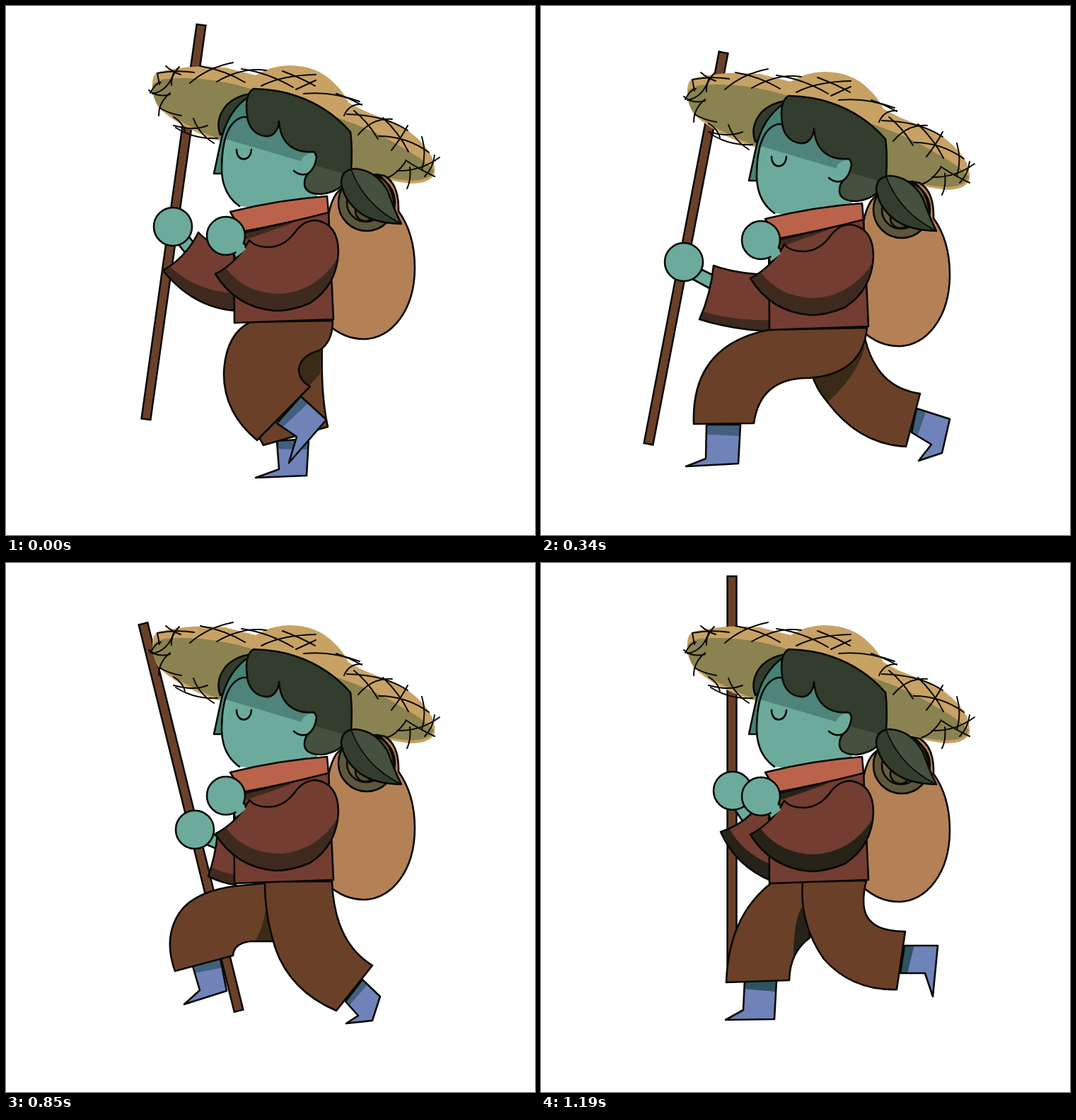
Animation of 748 by 748 pixels, one loop 1.36 s. Source, as an HTML page:

```html
<!DOCTYPE html>
<html lang="en">
<head>
<meta charset="utf-8">
<title>Wanderer</title>
<style>
html, body { margin: 0; width: 100%; height: 100%; overflow: hidden; background: #fff; }
svg { display: block; width: 100vw; height: 100vh; }
</style>
</head>
<body>
<svg id="stage" viewBox="0 0 748 748" fill="none" stroke-linecap="round" stroke-linejoin="round">
  <clipPath id="shade"><path d="M280 60V179L500 244V60Z"/></clipPath>
  <g id="scene"></g>
</svg>
<script>
const STEP = 170;
const INK = '#080806', SKIN = '#6cab9b', SKIN_DARK = '#4e8479', HAIR = '#46503f', HAIR_DARK = '#323d2e';
const COAT = '#743d31', PANTS = '#6a4128', BOOT = '#6f83b8';

const fill = (d, c, extra = '') => `<path d="${d}" fill="${c}" ${extra}/>`;
const line = (d, w = 2.6) => `<path d="${d}" stroke="${INK}" stroke-width="${w}"/>`;
const shape = (d, c) => fill(d, c) + line(d);
const shaded = (d, lit, dark) => fill(d, lit) + fill(d, dark, 'clip-path="url(#shade)"');
const disc = (x, y, r, c) =>
  `<circle cx="${x}" cy="${y}" r="${r}" fill="${c}" stroke="${INK}" stroke-width="2.6"/>`;
const shift = (dy, body) => `<g transform="translate(0 ${dy})">${body}</g>`;
const mix = (a, b, k) => [a[0] + (b[0] - a[0]) * k, a[1] + (b[1] - a[1]) * k];

function staff([x1, y1, x2, y2]) {
  const len = Math.hypot(x2 - x1, y2 - y1), ux = (x2 - x1) / len, uy = (y2 - y1) / len;
  const seg = (e, w, c) => `<path d="M${x1 - ux * e} ${y1 - uy * e}L${x2 + ux * e} ${y2 + uy * e}"
    stroke="${c}" stroke-width="${w}" stroke-linecap="butt"/>`;
  return seg(1.5, 15.4, INK) + seg(-1, 10.4, PANTS);
}

// Points run: two along the top, heel, toe, ankle
function boot(text, dark) {
  const p = text.split(' ').map(s => s.split(',').map(Number));
  const d = `M${p.join('L')}Z`;
  const band = [p[0], p[1], mix(p[1], p[2], .29), mix(p[0], p[p.length - 1], .29)];
  return fill(d, BOOT) + fill(`M${band.join('L')}Z`, dark) + line(d);
}

const hat = fill('M207 110Q207 96 216 93Q262 82 310 87L353 98Q376 84 400 84Q440 84 464 109Q477 121 484 136Q506 150 538 160Q572 174 592 198Q608 216 606 236Q601 251 572 251Q530 246 485 231L300 190Q248 174 216 144Q207 130 207 110Z', '#c8a264')
  + fill('M207 112Q212 106 224 103Q285 98 346 117L480 162Q530 180 560 200Q590 216 605 232Q601 247 570 247Q530 243 485 230L302 188Q252 170 217 143Q206 130 207 112Z', '#8a8250')
  + [
    'M214 95L217 111', 'M214 95Q240 90 266 94', 'M245 86Q232 100 234 112', 'M238 92Q230 120 207 124',
    'M226 85Q235 93 247 97', 'M260 109Q285 87 321 80', 'M275 85Q310 91 338 108', 'M298 107Q335 86 368 91',
    'M333 89Q370 94 406 115', 'M361 113Q390 98 438 97', 'M391 92Q420 103 437 113', 'M410 118L438 105',
    'M421 124Q460 120 500 135', 'M467 124Q485 130 503 140', 'M478 155Q485 138 503 139',
    'M482 153Q535 154 568 176', 'M492 148Q512 164 526 188', 'M498 182Q518 158 546 160',
    'M533 158Q556 180 569 206', 'M527 184Q566 184 598 207', 'M545 204Q558 188 568 169',
    'M588 185Q595 208 588 232', 'M606 211Q604 229 592 241', 'M565 218Q583 230 606 241',
    'M553 233Q586 234 613 214', 'M571 228Q573 246 567 258', 'M538 243Q552 239 565 220',
    'M202 119Q214 130 232 125', 'M216 155Q216 136 232 123', 'M204 123Q211 109 219 108',
    'M217 144Q230 152 248 155', 'M237 157Q250 165 253 177', 'M237 169Q266 177 285 169',
    'M265 159Q273 181 294 194', 'M240 172Q267 189 299 187'
  ].map(d => line(d, 2)).join('');

const bag = shape('M455 300Q460 272 470 262Q500 232 535 240Q556 252 555 290Q578 322 578 370C578 430 545 471 506 471Q478 471 455 450', '#b48156')
  + disc(510, 278, 40, '#5d573b') + disc(509, 278, 27, '#68603f') + disc(508, 290, 14, '#575137')
  + line('M525 238Q546 250 549 282');

const face = 'M305 232Q306 266 330 283L380 288L440 275V180L357 173Q352 156 335 157Q305 165 305 232Z';
const hair = 'M341 155Q337 125 350 117Q385 118 410 127Q455 142 487 178Q490 200 488 232Q480 262 446 266Q423 266 422 252Q422 242 427 237Q437 230 439 214Q438 206 433 206C408 208 388 195 386 163C385 178 376 185 367 184C352 183 342 170 341 155Z';
const tail = 'M474 250Q474 231 494 230Q523 232 540 262Q549 288 559 308Q520 307 500 292Q478 275 474 250Z';
const head = shape('M303 182Q295 160 312 140Q325 127 346 124L341 160Z', HAIR_DARK)
  + shape('M345 127Q312 148 303 195L294 237H306L320 168L345 157Z', '#438475')
  + shaded(face, SKIN, SKIN_DARK)
  + line('M357 173Q352 156 335 157Q305 165 305 232Q306 266 330 283')
  + shaded(hair, HAIR, HAIR_DARK)
  + fill('M418 217Q424 207 438 207Q440 226 427 237L415 237Z', SKIN)
  + line(hair) + line('M407 233Q416 241 427 237')
  + line('M326 203C326 221 346 221 347 203')
  + fill(tail, HAIR_DARK) + fill('M494 230Q523 232 540 262Q549 288 559 308Q507 282 488 231Z', HAIR)
  + line(tail) + line('M488 231Q507 282 559 308', 1.6);

const torso = dark => shape('M322 312L456 290L463 443L323 448Z', COAT)
  + fill('M337 318L420 299L400 309L340 330Z', dark)
  + line('M337 321L425 300', 1.6)
  + shape('M317 291Q385 274 454 269L456 292Q395 308 334 319Z', '#ba634a');

function nearArm(dark) {
  const d = 'M344 331Q352 341 372 341Q393 340 407 322Q420 303 438 303Q470 308 470 348Q468 395 430 420Q405 431 380 431Q325 426 296 379Q328 362 344 331Z';
  return shape('M320 346L336 334L345 348L326 360Z', SKIN) + fill(d, COAT)
    + fill('M296 379L311 371Q338 406 386 407Q440 404 470 355Q466 397 430 420Q405 431 380 431Q325 426 296 379Z', dark)
    + line(d) + disc(311, 325, 27, SKIN) + fill('M323 343L334 335L339 344L328 353Z', SKIN);
}

const contactFront = 'Q310 525 301 590L216 591Q212 480 322 458Z';
const reachFront = 'H345Q322 538 321 555L239 577Q222 530 245 495Q265 465 323 457Z';
const contactBoots = ['234,592 282,592 279,647 205,651 233,640', '524,603 531,569 578,584 567,632 534,643 552,620'];

// dy: body, hat, bag, near arm; far and near: boot, trouser leg
const poses = [
  { dy: [0, 0, 0, 0], staff: [276, 27, 198, 584], hand: [236, 312],
    wrist: 'M243 336L258 325L272 344L258 355Z',
    sleeve: 'M272 320Q292 342 325 346V431Q265 427 222 374Q255 355 272 320Z',
    cuff: 'M222 374L232 369Q270 404 325 406V431Q265 427 222 374Z',
    far: ['383,615 428,612 425,664 353,667 386,655', 'M400 470L447 480Q445 550 455 595L364 621L355 605Z'],
    shadow: 'M445 486L444 520L428 538L412 520Q416 495 445 486Z',
    near: ['383,590 417,552 453,585 400,646 411,609', 'M345 447L462 445Q462 475 443 487Q415 495 414 515Q415 530 430 538L355 614Q308 575 308 520Q310 465 345 447Z'] },
  { dy: [6, 4, 5, 3], staff: [289, 35, 145, 579], hand: [208, 334],
    wrist: 'M218 358L230 346L246 358L238 374Z',
    sleeve: 'M243 341Q280 361 325 366V442Q260 438 216 411Q238 380 243 341Z',
    cuff: 'M216 411L223 399Q265 420 325 426V442Q260 438 216 411Z',
    far: ['482,630 506,597 531,621 520,655 483,660 500,648', 'M455 470Q470 545 520 576L469 642Q425 625 397 582Q386 560 386 525Z'],
    shadow: 'M386 530L454 482Q444 535 397 582Q386 560 386 530Z',
    near: ['264,570 303,559 312,605 252,624 274,604', 'M323 457L462 450Q458 500 430 522Q405 536 375 535' + reachFront] },
  { dy: [10, 9, 10, 6], staff: [258, 66, 152, 619], hand: [202, 362],
    wrist: 'M214 386L228 373L246 382L238 399Z',
    sleeve: 'M244 367Q280 380 330 380V460Q275 459 224 443Q240 408 244 367Z',
    cuff: 'M224 443L229 432Q275 446 330 444V460Q275 459 224 443Z',
    far: [contactBoots[1], 'M458 470Q475 540 536 548L516 623Q450 620 405 560Q388 540 383 520Z'],
    shadow: 'M384 522L458 482Q446 525 405 560Q388 540 384 522Z',
    near: [contactBoots[0], 'M322 458L461 455Q455 520 380 526' + contactFront] },
  { dy: [5, 5, 7, 6], staff: [225, 87, 195, 650], hand: [212, 382],
    wrist: 'M226 404L236 388L250 396L244 412Z',
    sleeve: 'M244 385Q285 390 305 381L340 380V457Q300 478 236 468Q243 425 244 385Z',
    cuff: 'M236 468L239 457Q290 461 340 449V457Q300 478 236 468Z',
    far: ['500,597 510,560 550,577 537,629 533,607', 'M457 465C458 510 470 541 515 541L494 620C445 618 402 590 383 525Z'],
    shadow: 'M382 528L450 490Q435 520 394 557Z',
    near: ['284,596 323,596 319,647 251,652 282,632', 'M340 452L459 450Q455 505 410 522Q382 525 358 540Q346 560 346 575L343 597L259 596C263 530 284 472 340 452Z'] },
  { dy: [-1, 1, -1, 0], staff: [206, 98, 307, 652], hand: [258, 392],
    wrist: 'M272 411L283 395L296 401V420Z',
    sleeve: 'M291 387L325 390L340 465Q315 474 288 471Z',
    cuff: 'M288 457L338 454L340 465Q315 474 288 471Z',
    far: ['425,600 455,565 485,588 448,640 456,615', 'M440 490L445 500Q448 530 466 545L422 603L425 560Z'],
    shadow: 'M440 560L452 558L422 603Z',
    near: ['380,598 420,588 425,641 360,654 386,638', 'M342 446L461 445Q460 470 445 490Q433 530 446 580L354 605Q327 560 327 520Q328 480 342 446Z'] },
  { dy: [5, 4, 5, 4], staff: [194, 86, 329, 633], hand: [267, 377],
    wrist: 'M281 397L290 382L306 390L300 405Z',
    sleeve: 'M299 384L325 385V455Q306 453 286 443Q296 415 299 384Z',
    cuff: 'M289 429Q306 439 325 440V455Q306 453 286 443Z',
    far: ['264,570 303,559 312,605 252,624 274,604', 'M323 457L375 452L390 535' + reachFront],
    shadow: 'M367 490L391 535H352Q364 515 367 490Z',
    near: ['480,620 504,589 529,613 518,647 481,651 498,640', 'M366 451L461 450Q464 536 518 569L467 633Q402 605 381 545Q366 500 366 451Z'] },
  { dy: [10, 9, 9, 6], staff: [221, 54, 376, 595], hand: [308, 346],
    wrist: 'M310 365L325 360V380H314Z',
    sleeve: 'M300 384L288 397Q300 420 325 433V384Z',
    cuff: 'M300 384L288 397Q300 420 325 433V384Z',
    far: [contactBoots[0], 'M322 458L370 456L385 526' + contactFront],
    shadow: 'M367 482L385 526Q355 527 338 536Q358 510 367 482Z',
    near: [contactBoots[1], 'M364 456L461 455Q470 540 536 548L516 623Q450 620 405 560Q368 510 364 456Z'] },
  { dy: [5, 4, 8, 5], staff: [270, 19, 270, 570], hand: [271, 322], dark: '#272318', bootDark: '#2d5361',
    wrist: 'M273 347L288 339L300 356L285 365Z',
    sleeve: 'M298 354Q280 372 254 380Q275 428 325 449V345Z',
    cuff: 'M254 380L266 375Q285 410 325 426V449Q275 428 254 380Z',
    far: ['288,590 333,590 330,645 261,646 286,632', 'M325 453L375 451L380 530Q352 550 351 590L262 593Q265 500 325 453Z'],
    shadow: 'M369 486L380 530Q362 545 357 558Q357 505 369 486Z',
    near: ['508,580 514,541 561,541 554,613 543,580', 'M370 451L460 449C450 490 455 521 515 521L503 603Q440 605 400 560Q365 510 370 451Z'] }
];

function draw(p) {
  const dark = p.dark || '#3f2a1f', bootDark = p.bootDark || '#41607d';
  const [body, brim, pack, arm] = p.dy;
  const [farBoot, farLeg] = p.far, [nearBoot, nearLeg] = p.near;
  return staff(p.staff) + shift(brim, hat) + shift(pack, bag)
    + shape(p.wrist, SKIN) + disc(...p.hand, 27, SKIN)
    + fill(p.sleeve, COAT) + fill(p.cuff, dark) + line(p.sleeve)
    + boot(farBoot, bootDark) + fill(farLeg, PANTS) + fill(p.shadow, p.dark || '#3a2a18') + line(farLeg)
    + boot(nearBoot, bootDark) + shape(nearLeg, PANTS)
    + shift(body, head + torso(dark)) + shift(arm, nearArm(dark));
}

const scene = document.getElementById('scene');
const start = performance.now();
let shown = -1;
function tick(now) {
  const i = Math.floor(Math.max(0, now - start) / STEP) % poses.length;
  if (i !== shown) scene.innerHTML = draw(poses[shown = i]);
  requestAnimationFrame(tick);
}
tick(start);
</script>
</body>
</html>
```
